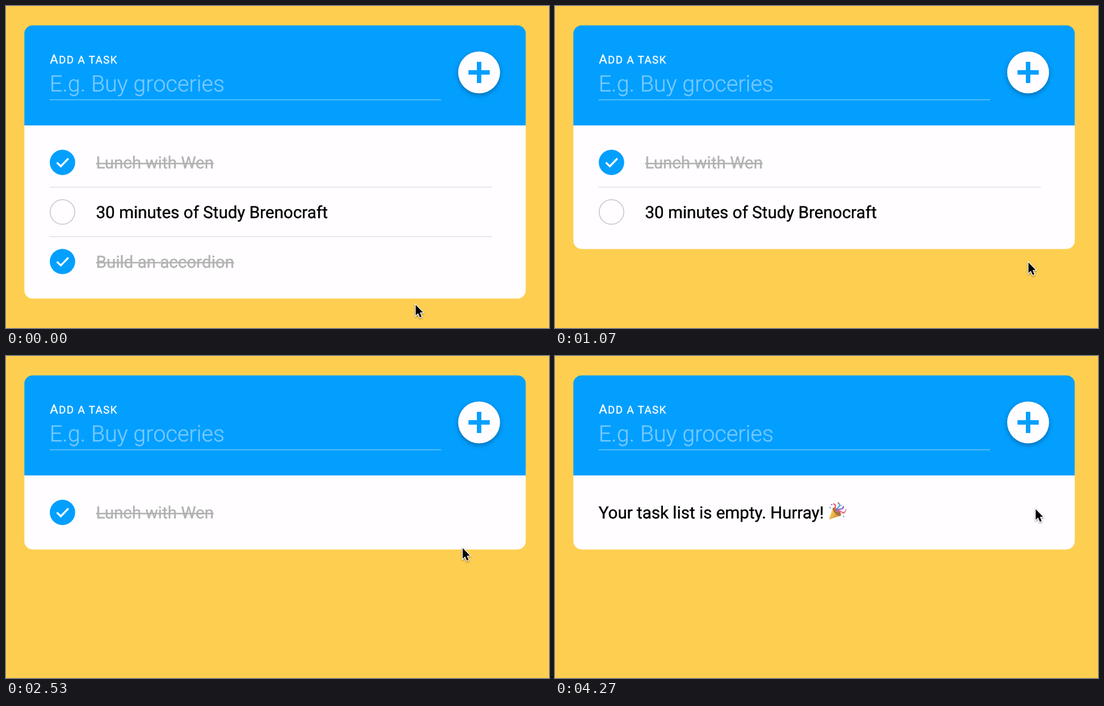
An HTML page with a canvas that plays this animation: 971x577 px, repeating every 4340 ms.

```html
<!DOCTYPE html>
<html lang="en">
<head>
<meta charset="utf-8">
<title>Task list</title>
<style>
  html, body { margin: 0; width: 100%; height: 100%; overflow: hidden; background: #fece50; }
  canvas { display: block; }
</style>
</head>
<body>
<canvas id="stage" width="971" height="577"></canvas>
<script>
const ctx = document.getElementById('stage').getContext('2d');
const LOOP = 4340;
const YELLOW = '#fece50', BLUE = '#029fff', WHITE = '#fffdff', PALE = '#78c9ff';
const GREY = '#b2b2b2', RULE = '#e0dee5', ICON = '#c9c6cb';
const LEFT = 78, RIGHT = 869, ROW = 88.8, TRASH = 857;
const rowY = i => 280.3 + i * ROW;

// A task disappears at its `gone` time.
const tasks = [
  { text: 'Lunch with Wen', done: true, gone: 3400 },
  { text: '30 minutes of Study Brenocraft', done: false, gone: 2330 },
  { text: 'Build an accordion', done: true, gone: 800 }
];

// Each move eases the pointer to x, y and lets it rest there.
const home = { x: 732, y: 534 };
const moves = [
  { from: 70, to: 600, x: 846, y: rowY(2) },
  { from: 1130, to: 1850, x: 854, y: rowY(1) - 1 },
  { from: 2330, to: 2530, x: 816, y: 343 },
  { from: 2530, to: 3000, x: 833, y: 277 },
  { from: 3000, to: 3200, x: TRASH, y: 276 },
  { from: 3400, to: 3560, x: 874, y: 281 },
  { from: 3560, to: 3930, x: 859, y: 273 }
];

function pointerAt(t) {
  let { x, y } = home;
  for (const m of moves) {
    const k = Math.min(1, Math.max(0, (t - m.from) / (m.to - m.from)));
    const e = k * (2 - k);
    x += (m.x - x) * e;
    y += (m.y - y) * e;
  }
  return { x, y };
}

function box(x, y, w, h, color) {
  ctx.fillStyle = color;
  ctx.fillRect(x, y, w, h);
}

function disc(x, y, r, color) {
  ctx.fillStyle = color;
  ctx.beginPath();
  ctx.arc(x, y, r, 0, Math.PI * 2);
  ctx.fill();
}

function stroke(color, width) {
  ctx.strokeStyle = color;
  ctx.lineWidth = width;
  ctx.stroke();
}

function ring(x, y, r, color, width) {
  ctx.beginPath();
  ctx.arc(x, y, r, 0, Math.PI * 2);
  stroke(color, width);
}

function trace(points, closed) {
  ctx.beginPath();
  points.forEach(([x, y]) => ctx.lineTo(x, y));
  if (closed) ctx.closePath();
}

// The hairline stroke gives the slightly heavier weight of smoothed text.
function write(text, x, y, size, color, weight = 400, spacing = 0) {
  ctx.font = `${weight} ${size}px Roboto, Arial, sans-serif`;
  ctx.letterSpacing = spacing + 'px';
  ctx.textRendering = 'geometricPrecision';
  ctx.fillStyle = ctx.strokeStyle = color;
  ctx.lineWidth = 0.4;
  ctx.fillText(text, x, y);
  ctx.strokeText(text, x, y);
  return ctx.measureText(text).width;
}

function shadow(color, blur, dy) {
  ctx.shadowColor = color;
  ctx.shadowBlur = blur;
  ctx.shadowOffsetY = dy;
}

function drawCard(bottom) {
  const x = 32.8, y = 34.7, w = 896.6;
  ctx.fillStyle = WHITE;
  ctx.beginPath();
  ctx.roundRect(x, 200, w, bottom - 200, [0, 0, 15, 15]);
  ctx.fill();
  ctx.fillStyle = BLUE;
  ctx.beginPath();
  ctx.roundRect(x, y, w, 214 - y, [15, 15, 0, 0]);
  ctx.fill();
}

function drawHeader() {
  const w = write('A', LEFT + 0.5, 103, 22.5, '#fff', 400, 1.4);
  write('DD A TASK', LEFT + 0.5 + w, 103, 19, '#fff', 400, 1.4);
  write('E.g. Buy groceries', LEFT, 153, 40.2, PALE, 300);
  box(LEFT, 167.3, 700, 1.4, 'rgba(255,255,255,.43)');

  ctx.save();
  shadow('rgba(0,0,0,.32)', 9, 3);
  disc(846, 119, 37.5, WHITE);
  ctx.restore();
  box(827, 115, 38, 8, BLUE);
  box(842, 100, 8, 38, BLUE);
}

function drawTrash(y) {
  ctx.fillStyle = ICON;
  ctx.beginPath();
  ctx.roundRect(TRASH - 12, y - 13.5, 24, 4.5, 1.5);
  ctx.roundRect(TRASH - 5, y - 15.5, 10, 4, 1.5);
  ctx.fill();
  trace([[TRASH - 10.5, y - 7], [TRASH + 10.5, y - 7], [TRASH + 9, y + 16], [TRASH - 9, y + 16]], true);
  ctx.fill();
  for (const dx of [-4.5, 0, 4.5]) box(TRASH + dx - 0.7, y - 3, 1.4, 15, WHITE);
}

function drawTask(task, y, hover) {
  if (task.done) {
    disc(101, y, 22.7, BLUE);
    trace([[91, y + 0.3], [98, y + 7], [111.5, y - 7]]);
    stroke('#fff', 3.4);
  } else {
    ring(101, y, 22, '#c6c4cb', 1.5);
  }
  const w = write(task.text, 161, y + 10.7, 30, task.done ? GREY : '#000');
  if (task.done) box(161, y + 0.7, w, 2.6, GREY);
  if (hover) drawTrash(y);
}

function drawPopper(x, y) {
  const colors = ['#e8574e', '#4a97dd', '#8b63c4', '#e7699c'];
  ctx.save();
  ctx.translate(x, y);
  ctx.lineCap = 'round';
  const cone = ctx.createLinearGradient(4, 16, 18, 27);
  cone.addColorStop(0, '#ffd45c');
  cone.addColorStop(1, '#d08a2e');
  ctx.fillStyle = cone;
  trace([[1, 31], [8, 10], [22, 24]], true);
  ctx.fill();
  ctx.fillStyle = '#a8703a';
  ctx.beginPath();
  ctx.ellipse(15, 17, 9.8, 4.3, Math.PI / 4, 0, Math.PI * 2);
  ctx.fill();

  // Streamers fan out of the cone, with confetti scattered around them.
  ctx.translate(15, 17);
  colors.forEach((color, i) => {
    ctx.save();
    ctx.rotate(-1.9 + i * 0.65);
    ctx.beginPath();
    ctx.moveTo(0, 0);
    ctx.bezierCurveTo(5, -7, 10, 6, 15, -1);
    stroke(color, 2.2);
    ctx.restore();
  });
  for (let i = 0; i < 9; i++) {
    const a = -2.6 + i * 0.4, r = 14 + 2.5 * Math.sin(i * 2.4);
    disc(r * Math.cos(a), r * Math.sin(a), 1.2, colors[(i + 1) % 4]);
  }
  ctx.restore();
}

function drawPointer({ x, y }) {
  ctx.save();
  ctx.translate(x + 0.6, y + 1.5);
  trace([[0, 0], [0, 19], [4.3, 15], [7.6, 22.6], [10.6, 21.3], [7.4, 13.8], [13, 13.5]], true);
  ctx.save();
  shadow('rgba(0,0,0,.4)', 3, 1.5);
  stroke('#fff', 2.6);
  ctx.restore();
  ctx.fillStyle = '#000';
  ctx.fill();
  ctx.restore();
}

function draw(t) {
  const list = tasks.filter(task => t < task.gone);
  const rows = Math.max(1, list.length);
  const pointer = pointerAt(t);

  box(0, 0, 971, 577, YELLOW);
  drawCard(rowY(rows - 1) + 66.4);
  drawHeader();

  list.forEach((task, i) => {
    const y = rowY(i);
    drawTask(task, y, Math.abs(pointer.y - y) < ROW / 2);
    if (i < list.length - 1) box(LEFT, y + 43.5, RIGHT - LEFT, 1.5, RULE);
  });
  if (!list.length) {
    write('Your task list is empty. Hurray!', LEFT, 291, 30, '#000');
    drawPopper(489, 262);
  }
  // Focus ring while the second task's button is held down
  if (t >= 2195 && t < tasks[1].gone) ring(854, 370, 32.5, '#111', 2.3);
  drawPointer(pointer);
}

const start = performance.now();
function tick() {
  draw((performance.now() - start) % LOOP);
  requestAnimationFrame(tick);
}
tick();
</script>
</body>
</html>
```
